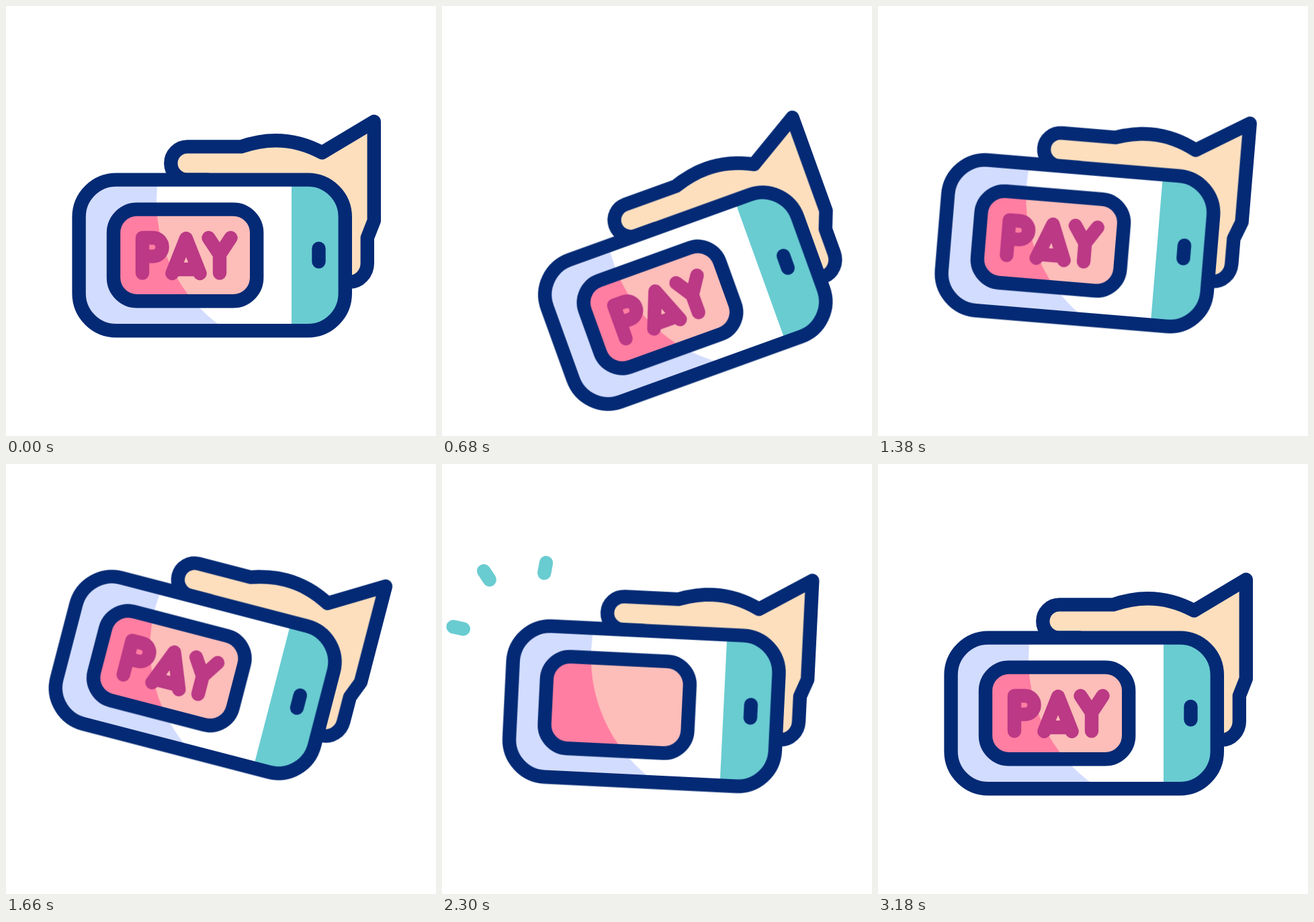
Recreate the animation shown at these times as an HTML page. Size 640 by 640 pixels, loop 3620 ms.

```html
<!DOCTYPE html>
<html lang="en">
<head>
<meta charset="utf-8">
<title>Mobile payment</title>
<style>
  @property --head { syntax: "<number>"; inherits: true; initial-value: 0; }
  @property --tail { syntax: "<number>"; inherits: true; initial-value: 0; }

  :root {
    --loop: 3620ms;
    --smooth: cubic-bezier(.333, 0, .667, 1);
    --navy: #042a75;
    --teal: #69ccd1;
  }
  html, body { margin: 0; width: 100%; height: 100%; overflow: hidden; background: #fff; }
  svg { display: block; width: 100%; height: 100%; }

  .line {
    stroke: var(--navy);
    stroke-width: 20.4;
    stroke-linecap: round;
    stroke-linejoin: round;
    fill: none;
  }

  .swing {
    transform-origin: 517.2px 244.3px;
    animation: swing var(--loop) var(--smooth) infinite;
  }
  @keyframes swing {
    0% { transform: rotate(0deg); }
    5.525% { transform: rotate(0deg); animation-timing-function: cubic-bezier(.25, .3, .1, 1); }
    27.624% { transform: rotate(-21.2deg); }
    44.199% { transform: rotate(16deg); }
    55.249% { transform: rotate(-7.1deg); }
    64.088% { transform: rotate(2.9deg); }
    81.215%, 100% { transform: rotate(0deg); }
  }

  .letters path {
    fill: none;
    stroke: #bb3985;
    stroke-width: 20.4;
    stroke-linecap: round;
    stroke-linejoin: round;
    animation: roll var(--loop) calc(var(--i) * 66.7ms) var(--smooth) infinite;
  }
  @keyframes roll {
    0%, 47.87% { transform: translateY(0); }
    58.92% { transform: translateY(-118px); }
    58.93%, 73.2% { transform: translateY(118px); }
    84.25%, 100% { transform: translateY(0); }
  }

  /* Each spark is a line whose front runs ahead and whose back catches up. */
  .sparks {
    stroke: var(--teal);
    stroke-width: 20.4;
    stroke-linecap: round;
    stroke-dasharray: calc((var(--head) - var(--tail)) * 1px) 200px;
    stroke-dashoffset: calc(var(--tail) * -1px);
    animation:
      head var(--loop) var(--smooth) infinite,
      tail var(--loop) var(--smooth) infinite,
      show var(--loop) step-end infinite;
  }
  @keyframes head {
    0%, 55.249% { --head: 0; }
    62.431%, 100% { --head: 50; }
  }
  @keyframes tail {
    0%, 58.011% { --tail: 0; }
    66.851%, 100% { --tail: 50; }
  }
  @keyframes show {
    0% { opacity: 0; }
    55.249% { opacity: 1; }
    66.851%, 100% { opacity: 0; }
  }
</style>
</head>
<body>
<svg viewBox="0 0 640 640" role="img" aria-label="Phone with a PAY button">
  <defs>
    <clipPath id="screen"><rect x="108.6" y="258.6" width="396.2" height="224.6" rx="55.5"/></clipPath>
    <clipPath id="card"><rect x="160" y="302.6" width="213.2" height="136.6" rx="35"/></clipPath>
  </defs>

  <g class="sparks" transform="translate(133 267)">
    <path d="M69 0h50" transform="rotate(192)"/>
    <path d="M79 0h50" transform="rotate(236.7)"/>
    <path d="M72 0h50" transform="rotate(280.4)"/>
  </g>

  <g class="swing">
    <path class="line" style="fill:#fddfbe" d="M300 258.8H270a24.7 24.7 0 0 1 0-49.4H350C391 195 431 197 470.5 218.3L547.8 172V319.5L537.8 345V383C537.8 398 526 411 511 411H480V300Z"/>

    <g clip-path="url(#screen)">
      <rect x="100" y="250" width="410" height="240" fill="#d2dcfe"/>
      <circle cx="451.5" cy="291" r="227.5" fill="#fff"/>
      <rect x="425" y="250" width="90" height="240" fill="#69ccd1"/>
    </g>
    <rect class="line" x="108.6" y="258.6" width="396.2" height="224.6" rx="55.5"/>
    <path class="line" d="M465.5 361V380.6"/>

    <g clip-path="url(#card)">
      <rect x="150" y="290" width="240" height="160" fill="#ff7ea1"/>
      <circle cx="451.5" cy="291" r="227.5" fill="#fdbdb9"/>
      <g class="letters">
        <path style="--i:0" d="M203 397.5V345H218.8a13.8 13.8 0 0 1 0 27.6H203"/>
        <path style="--i:1" d="M247.4 398L268 346L288.6 398M253 392H283"/>
        <path style="--i:2" d="M301.5 345L318 370L334.5 345M318 370V397.5"/>
      </g>
    </g>
    <rect class="line" x="160" y="302.6" width="213.2" height="136.6" rx="35"/>
  </g>
</svg>
</body>
</html>
```
